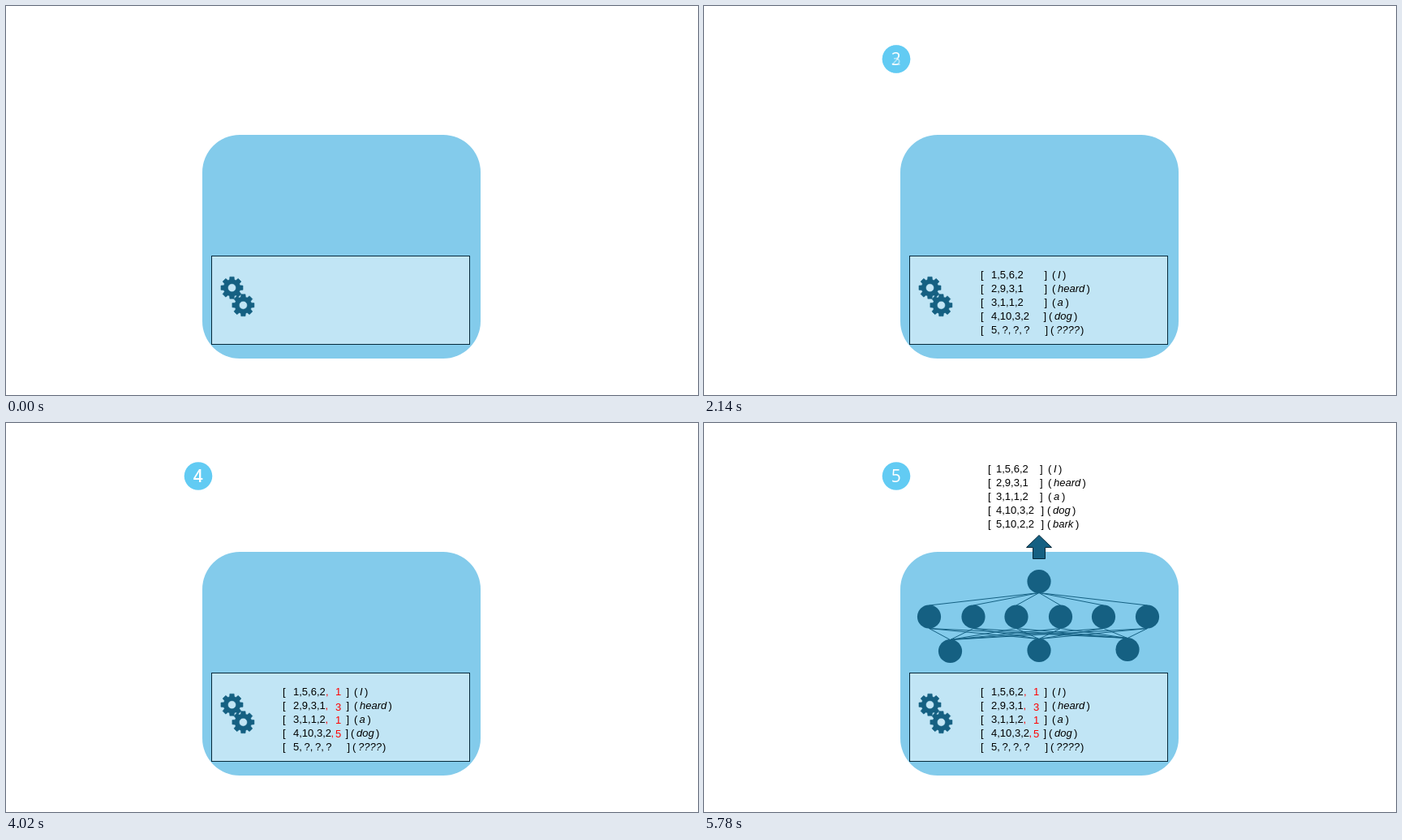
An HTML page for the animation above (8000 ms loop, 853 by 480 pixels).

```html
<!DOCTYPE html>
<html lang="en">
<head>
<meta charset="utf-8">
<title>Word vectors</title>
<style>
  html, body { margin: 0; width: 100%; height: 100%; overflow: hidden; background: #fff; }
  svg { display: block; width: 100vw; height: 100vh; }
  text { font: 13px "Liberation Sans", Arial, sans-serif; white-space: pre; }
  .digit { font: 21px "Open Sans", "Noto Sans", sans-serif; fill: #fff; text-anchor: middle; }
  .word { font-style: italic; }
</style>
</head>
<body>
<svg id="stage" viewBox="0 0 853 480"></svg>
<script>
const LOOP = 8000, TICK = 60, SOFT = 21;
const TEAL = '#156082', NAVY = '#06293a';
const stage = document.getElementById('stage');

function add(parent, tag, attrs = {}, text) {
  const el = document.createElementNS('http://www.w3.org/2000/svg', tag);
  for (const key in attrs) el.setAttribute(key, attrs[key]);
  if (text !== undefined) el.textContent = text;
  parent.appendChild(el);
  return el;
}

const label = (parent, x, y, text, attrs = {}) => add(parent, 'text', { x, y, ...attrs }, text);
const line = (parent, x1, y1, x2, y2) => add(parent, 'line', { x1, y1, x2, y2, stroke: TEAL });
const node = (parent, cx, cy) => add(parent, 'circle', { cx, cy, r: 14.6, fill: TEAL });

// One row: [ numbers ] ( word )
function row(parent, y, [numX, nums, closeX, parenX, wordX, word, endX], openX) {
  label(parent, openX, y, '[');
  label(parent, numX, y, nums, nums.includes(' ') ? { 'word-spacing': -1 } : {});
  label(parent, closeX, y, ']');
  label(parent, parenX, y, '(');
  label(parent, wordX, y, word, { class: 'word' });
  label(parent, endX, y, ')');
}

function gear(parent, cx, cy) {
  const points = [];
  for (let i = 0; i < 8; i++) {
    for (const [deg, r] of [[-17, 10.4], [-11, 13.8], [11, 13.8], [17, 10.4]]) {
      const a = (i * 45 + deg) * Math.PI / 180;
      points.push(`${(r * Math.sin(a)).toFixed(2)} ${(-r * Math.cos(a)).toFixed(2)}`);
    }
  }
  const hole = 'M5 0A5 5 0 1 0 -5 0A5 5 0 1 0 5 0Z';
  const el = add(parent, 'path', {
    d: `M${points.join('L')}Z${hole}`, fill: TEAL, 'fill-rule': 'evenodd',
    stroke: TEAL, 'stroke-width': 0.5, 'stroke-linejoin': 'round'
  });
  return deg => el.setAttribute('transform', `translate(${cx} ${cy}) rotate(${deg})`);
}

// Group revealed upwards from bottom to top with a soft edge.
function wipeGroup(id, top, bottom) {
  const grad = add(stage, 'linearGradient', { id: id + 'Grad', gradientUnits: 'userSpaceOnUse', x1: 0, x2: 0 });
  add(grad, 'stop', { offset: 0, 'stop-color': '#000' });
  add(grad, 'stop', { offset: 1, 'stop-color': '#fff' });
  const mask = add(stage, 'mask', {
    id, maskUnits: 'userSpaceOnUse', x: 0, y: 0, width: 853, height: 480,
    style: 'color-interpolation: sRGB'
  });
  add(mask, 'rect', { width: 853, height: 480, fill: `url(#${id}Grad)` });
  const group = add(stage, 'g', { mask: `url(#${id})` });
  const reveal = p => {
    const lead = bottom - p * (bottom - top + SOFT);
    grad.setAttribute('y1', lead);
    grad.setAttribute('y2', lead + SOFT);
    group.style.display = p > 0 ? '' : 'none';
  };
  return { group, reveal };
}

// Panel
add(stage, 'rect', { x: 242, y: 159, width: 343, height: 276, rx: 46, fill: '#83cbeb' });
add(stage, 'rect', { x: 253.5, y: 308.5, width: 318, height: 109, fill: '#c1e5f5', stroke: NAVY });
const turnUpper = gear(stage, 278.5, 347.7);
const turnLower = gear(stage, 292.4, 369.2);

// Input vectors
const input = add(stage, 'g');
[
  [354, '1,5,6,2', 419.5, 429, 436, 'I', 442],
  [354, '2,9,3,1', 419.5, 429, 436, 'heard', 471.5],
  [354, '3,1,1,2', 419.5, 429, 435.5, 'a', 445.5],
  [354, '4,10,3,2', 418.5, 425, 432, 'dog', 456]
].forEach((r, i) => row(input, 336 + i * 17, r, 341));

const unknown = add(stage, 'g');
row(unknown, 404, [354, '5, ?, ?, ?', 420.5, 427, 434, '????', 464], 341);

const weights = add(stage, 'g', { fill: '#f00' });
[[394, 336, '1', 336], [393.5, 353, '3', 354.5], [393.5, 370, '1', 371], [400.5, 387, '5', 387.5]]
  .forEach(([commaX, commaY, digit, y]) => {
    label(weights, commaX, commaY, ',');
    label(weights, 406, y, digit);
  });

// Network
const net = wipeGroup('netMask', 181, 296);
const hidden = [277.5, 332, 385, 439.5, 492.5, 546.5];
const base = [[303.5, 281.5], [413, 280.5], [522, 279.5]];
for (const x of hidden) {
  line(net.group, 413, 209.5, x, 225);
  for (const [bx, by] of base) line(net.group, x, 253.5, bx, by - 14);
}
for (const x of hidden) node(net.group, x, 239);
for (const [x, y] of base) node(net.group, x, y);
node(net.group, 413, 195.5);

// Arrow and output vectors
const arrow = wipeGroup('arrowMask', 138, 168);
add(arrow.group, 'path', {
  d: 'M413 138.5L428.5 153.5H420.5V167.5H405.5V153.5H397.5Z', fill: TEAL, stroke: NAVY
});

const output = wipeGroup('outMask', 46, 134);
[
  [360, '1,5,6,2', 414, 424, 431, 'I', 437],
  [360, '2,9,3,1', 414, 424, 431, 'heard', 466.5],
  [360, '3,1,1,2', 414, 424, 431, 'a', 441],
  [360, '4,10,3,2', 415.5, 423, 430, 'dog', 454],
  [360, '5,10,2,2', 415.5, 423, 430, 'bark', 458]
].forEach((r, i) => row(output.group, 61 + i * 17, r, 350));

// Step badges, each fading in over the one before
const badgeStarts = [0, 950, 1900, 3540, 4760];
const badges = badgeStarts.map((_, i) => {
  const g = add(stage, 'g');
  add(g, 'circle', { cx: 237, cy: 65.5, r: 17.3, fill: '#62cbf3' });
  label(g, 236.7, 73, i + 1, { class: 'digit', style: `font-weight: ${i % 3 ? 500 : 600}` });
  return g;
});

// Progress in whole ticks
function progress(t, start, ticks = 8) {
  const n = Math.floor((t - start) / TICK + 1e-6);
  return Math.min(1, Math.max(0, n / ticks));
}

function draw(t) {
  const fly = progress(t, 0);
  input.setAttribute('transform', `translate(0 ${(1 - fly) * 165})`);
  input.style.display = fly > 0 ? '' : 'none';

  unknown.style.opacity = progress(t, 950);
  weights.style.opacity = progress(t, 3060);

  const spin = 360 * progress(t, 1900, 16);
  turnUpper(spin);
  turnLower(-spin);

  net.reveal(progress(t, 4220));
  arrow.reveal(progress(t, 4760));
  output.reveal(progress(t, 5300));

  badges.forEach((b, i) => {
    const covered = i + 1 < badges.length && progress(t, badgeStarts[i + 1]) === 1;
    b.style.opacity = covered ? 0 : progress(t, badgeStarts[i]);
  });
}

const begin = performance.now();
function frame() {
  draw((performance.now() - begin) % LOOP);
  requestAnimationFrame(frame);
}
draw(0);
requestAnimationFrame(frame);
</script>
</body>
</html>
```
